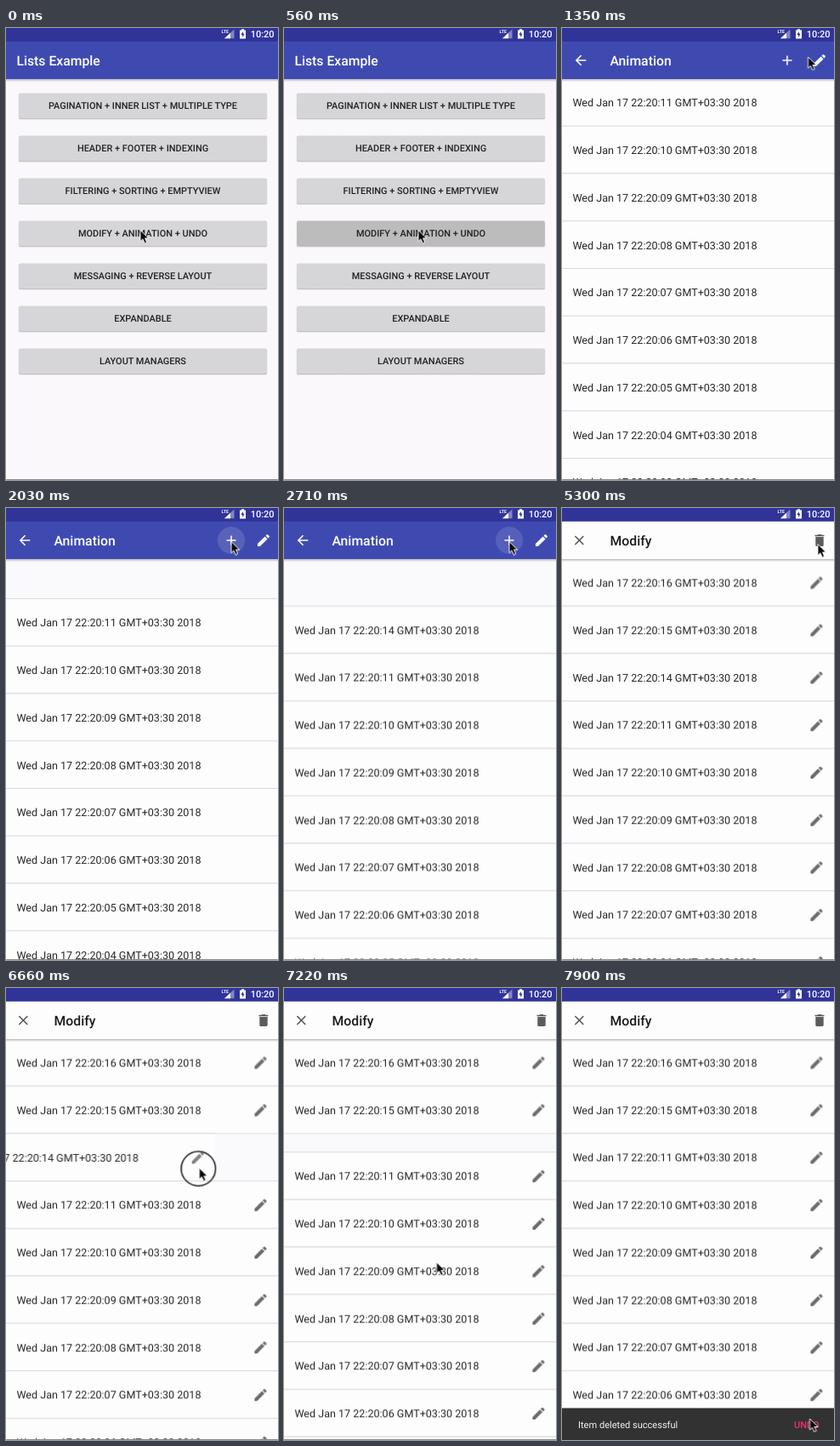
Animation of 320x531 px, one loop 8000 ms. Source, as an HTML page:

```html
<!DOCTYPE html>
<html lang="en">
<head>
<meta charset="utf-8">
<title>Lists Example</title>
<style>
  html, body { margin: 0; width: 100%; height: 100%; overflow: hidden; background: #faf8fb; }
  svg { display: block; width: 100%; height: 100%; }
  text { font-family: Roboto, "Noto Sans", sans-serif; text-rendering: geometricPrecision; }
  .title { font-size: 15.75px; font-weight: 500; }
  .caps { font-size: 10.95px; font-weight: 500; }
  .note { font-size: 11.05px; }
  .clock { font-size: 11px; font-weight: 500; }
  .net { font-size: 5.2px; font-weight: 700; }
  .row { font-size: 12.57px; }
</style>
</head>
<body>
<svg viewBox="0 0 320 531" xmlns="http://www.w3.org/2000/svg">
  <defs>
    <linearGradient id="shade" x2="0" y2="1">
      <stop offset="0" stop-color="#000" stop-opacity=".24"/>
      <stop offset="1" stop-color="#000" stop-opacity="0"/>
    </linearGradient>
    <clipPath id="btnClip"><rect x="15" y="226.5" width="292" height="29.5" rx="2"/></clipPath>
  </defs>
  <g id="home"></g>
  <g id="page"></g>
  <rect y="530" width="320" height="1" fill="#8c8b8e"/>
  <g id="snack"></g>
  <g id="status"></g>
  <g id="pointer"></g>
</svg>
<script>
const LOOP = 8000, ROW = 55.75, TOP = 59.5, SHIFT = 250;
const EASE = 'ease-in-out';
const NS = 'http://www.w3.org/2000/svg';
const ICONS = {
  back: 'M20 11H7.83l5.59-5.59L12 4l-8 8 8 8 1.41-1.41L7.83 13H20z',
  add: 'M19 13h-6v6h-2v-6H5v-2h6V5h2v6h6z',
  edit: 'M3 17.25V21h3.75L17.81 9.94l-3.75-3.75zM20.71 7.04a1 1 0 0 0 0-1.41l-2.34-2.34a1 1 0 0 0-1.41 0l-1.83 1.83 3.75 3.75z',
  close: 'M19 6.41L17.59 5 12 10.59 6.41 5 5 6.41 10.59 12 5 17.59 6.41 19 12 13.41 17.59 19 19 17.59 13.41 12z',
  trash: 'M6 19a2 2 0 0 0 2 2h8a2 2 0 0 0 2-2V7H6zM19 4h-3.5l-1-1h-5l-1 1H5v2h14z'
};

// Moments of the story, in ms
const OPEN = 350, MODIFY = 5080, REMOVE = 7080;
const NEW = [14, 15, 16];
const addTap = i => 1770 + i * 590;
const DRAG = { press: 5985, start: 6300, end: 6937, dx: -189 };
const MODE = [[MODIFY + 50, 0], [MODIFY + 200, 1]];

const $ = id => document.getElementById(id);

function add(parent, tag, attrs = {}, text) {
  const el = document.createElementNS(NS, tag);
  for (const k in attrs) el.setAttribute(k, attrs[k]);
  if (text) el.textContent = text;
  return parent.appendChild(el);
}
const rect = (p, x, y, width, height, fill, more) =>
  add(p, 'rect', { x, y, width, height, fill, ...more });
const label = (p, x, y, text, cls, fill, more) =>
  add(p, 'text', { x, y, class: cls, fill, ...more }, text);
const icon = (p, name, x, y, fill) => add(p, 'path', {
  d: ICONS[name], fill, transform: `translate(${x} ${y}) scale(.785) translate(-12 -12)`
});

// steps: [time, value, easing to the next step]
function play(el, prop, steps, format = v => v) {
  const frames = steps.map(([t, v, easing = 'linear']) =>
    ({ offset: t / LOOP, [prop]: format(v), easing }));
  const first = frames[0], last = frames[frames.length - 1];
  if (first.offset > 0) frames.unshift({ ...first, offset: 0, easing: 'linear' });
  if (last.offset < 1) frames.push({ ...last, offset: 1 });
  el.animate(frames, { duration: LOOP, iterations: Infinity });
}
const fade = (el, steps) => play(el, 'opacity', steps);
const move = (el, steps) => play(el, 'transform', steps, ([x, y]) => `translate(${x}px,${y}px)`);
const scale = (el, steps) => play(el, 'transform', steps, s => `scale(${s})`);
const pulse = (a, b, peak, rise, fall) => [[a, 0], [a + rise, peak], [b, peak], [b + fall, 0]];

function bar(p, fill) {
  rect(p, 0, 60, 320, 3.5, 'url(#shade)');
  rect(p, 0, 14, 320, 46, fill);
}

// Home screen
const home = $('home');
rect(home, 0, 0, 320, 531, '#faf8fb');
bar(home, '#3f4ab1');
label(home, 12.4, 44, 'Lists Example', 'title', '#fff');
[
  'PAGINATION + INNER LIST + MULTIPLE TYPE', 'HEADER + FOOTER + INDEXING',
  'FILTERING + SORTING + EMPTYVIEW', 'MODIFY + ANIMATION + UNDO',
  'MESSAGING + REVERSE LAYOUT', 'EXPANDABLE', 'LAYOUT MANAGERS'
].forEach((text, i) => {
  const y = 76.5 + i * 50;
  rect(home, 14.6, y + .6, 292.8, 30.6, '#000', { rx: 2.5, opacity: .09 });
  rect(home, 15, y + .5, 292, 30, '#000', { rx: 2, opacity: .14 });
  rect(home, 15, y, 292, 29.5, '#d6d5d7', { rx: 2 });
  if (i === 3) {
    const clip = add(home, 'g', { 'clip-path': 'url(#btnClip)' });
    const center = add(clip, 'g', { transform: 'translate(158 240)' });
    const spot = add(center, 'circle', { r: 170, opacity: 0 });
    scale(spot, [[OPEN, .05, 'ease-out'], [OPEN + 300, 1]]);
    fade(spot, pulse(OPEN, OPEN + 300, .12, 60, 200));
  }
  label(home, 161, y + 18.8, text, 'caps', '#222', { 'text-anchor': 'middle' });
});

// List screen
const page = $('page');
move(page, [[OPEN + 210, [0, 42], 'ease-out'], [OPEN + 500, [0, 0]]]);
fade(page, [[OPEN + 210, 0], [OPEN + 410, 1]]);
rect(page, 0, 14, 320, 560, '#faf9fb');

// Every row steps down for each newer one and up when row 14 goes
function slotSteps(sec) {
  let slot = Math.max(0, 11 - sec);
  const steps = [[0, [0, slot * ROW]]];
  const shift = (t, by) => {
    steps.push([t, [0, slot * ROW], EASE]);
    slot += by;
    steps.push([t + SHIFT, [0, slot * ROW]]);
  };
  NEW.forEach((s, i) => { if (s > sec) shift(addTap(i) + 80, 1); });
  if (sec < 14) shift(REMOVE, -1);
  return steps;
}

const list = add(page, 'g', { transform: `translate(0 ${TOP})` });
for (let sec = 16; sec > 1; sec--) {
  if (sec === 12 || sec === 13) continue;
  const holder = add(list, 'g');
  const row = add(holder, 'g');
  move(holder, slotSteps(sec));
  rect(row, 0, 0, 320, ROW, '#fefdfe');
  for (const y of [0, ROW]) rect(row, 0, y - .5, 320, 1, '#dbdade');
  const time = `22:20:${String(sec).padStart(2, '0')}`;
  label(row, 12.4, 32.8, `Wed Jan 17 ${time} GMT+03:30 2018`, 'row', '#262626');
  fade(icon(row, 'edit', 299.5, 28.3, '#6c6b6e'), MODE);
  const born = NEW.indexOf(sec);
  if (born >= 0) {
    const t = addTap(born) + SHIFT + 150;
    fade(holder, [[t, 0], [t + 120, 1]]);
  }
  if (sec === 14) move(row, [
    [DRAG.start, [0, 0], 'ease-in'], [DRAG.end, [DRAG.dx, 0]], [DRAG.end + 110, [-325, 0]]
  ]);
}

bar(page, '#3f4ab1');
function tapGlow(x, times) {
  const glow = add(page, 'circle', { cx: x, cy: 38, r: 16, fill: '#fff', opacity: 0 });
  fade(glow, times.flatMap(t => pulse(t, t + 340, .13, 90, 130)));
}
tapGlow(265, NEW.map((_, i) => addTap(i)));
tapGlow(303, [MODIFY]);
icon(page, 'back', 22, 38, '#fff');
label(page, 56.5, 44, 'Animation', 'title', '#fff');
icon(page, 'add', 265, 38, '#fff');
icon(page, 'edit', 303, 38, '#fff');

const mode = add(page, 'g');
fade(mode, MODE);
rect(mode, 0, 14, 320, 46, '#fefdfe');
icon(mode, 'close', 20.3, 38, '#555457');
label(mode, 56.5, 44, 'Modify', 'title', '#1c1c1c');
icon(mode, 'trash', 303, 38, '#5c5b5e');

// Snackbar
const snack = $('snack');
move(snack, [[REMOVE + 100, [0, 40], EASE], [REMOVE + 350, [0, 0]]]);
rect(snack, 0, 493.5, 320, 38, '#323232');
const note = add(snack, 'g');
fade(note, [[REMOVE + 170, 0], [REMOVE + 350, 1]]);
label(note, 19, 517.2, 'Item deleted successful', 'note', '#f4f4f4');
label(note, 273, 517.2, 'UNDO', 'caps', '#f0306f');

// Status bar
const status = $('status');
rect(status, 0, 0, 320, 15.8, '#303498');
add(status, 'path', { d: 'M257 12.3H268.5V1.5Z', fill: '#fff', opacity: .4 });
add(status, 'path', { d: 'M257 12.3H264V5.7Z', fill: '#fff' });
label(status, 253.5, 6, 'LTE', 'net', '#fff');
add(status, 'path', { d: 'M275 2.4h2V1.2h3v1.2h2v10h-7z', fill: '#fff' });
add(status, 'path', { d: 'M279 4l-2.6 4h1.7v3l2.6-4.2H279z', fill: '#303498' });
label(status, 287.7, 10.9, '10:20', 'clock', '#fff');

// Mouse pointer: rests between legs of [start, end, x, y, easing]
const pointer = $('pointer');
let at = [158, 237.5];
move(pointer, [
  [680, 1250, 289.5, 34],
  [1400, 1580, 265, 39.5],
  [3800, 4040, 305, 48],
  [4700, 4760, 301, 42.5],
  [5400, 5760, 301, 211.5],
  [DRAG.start, DRAG.end, 301 + DRAG.dx, 211.5, 'ease-in'],
  [7000, 7890, 291.5, 506, 'ease-out']
].flatMap(([start, end, x, y, easing = EASE]) => {
  const from = at;
  at = [x, y];
  return [[start, from, easing], [end, at]];
}));

// Press ring around the pointer
const ring = add(pointer, 'circle', {
  cx: -1, cy: .7, r: 20.2, fill: '#fff', 'fill-opacity': .15, stroke: '#111', 'stroke-width': 1.5
});
const taps = [OPEN, ...NEW.map((_, i) => addTap(i)), MODIFY].map(t => [t, t + 130]);
fade(ring, [...taps, [DRAG.press, DRAG.end]].flatMap(([a, b]) => pulse(a, b, 1, 30, 50)));
add(pointer, 'path', {
  d: 'M0 0V13.2L3 10.5L5.2 15.4L7.7 14.3L5.5 9.5H9.7Z',
  fill: '#0b0b0b', stroke: '#fff', 'stroke-width': .9, 'stroke-linejoin': 'round'
});
</script>
</body>
</html>
```
